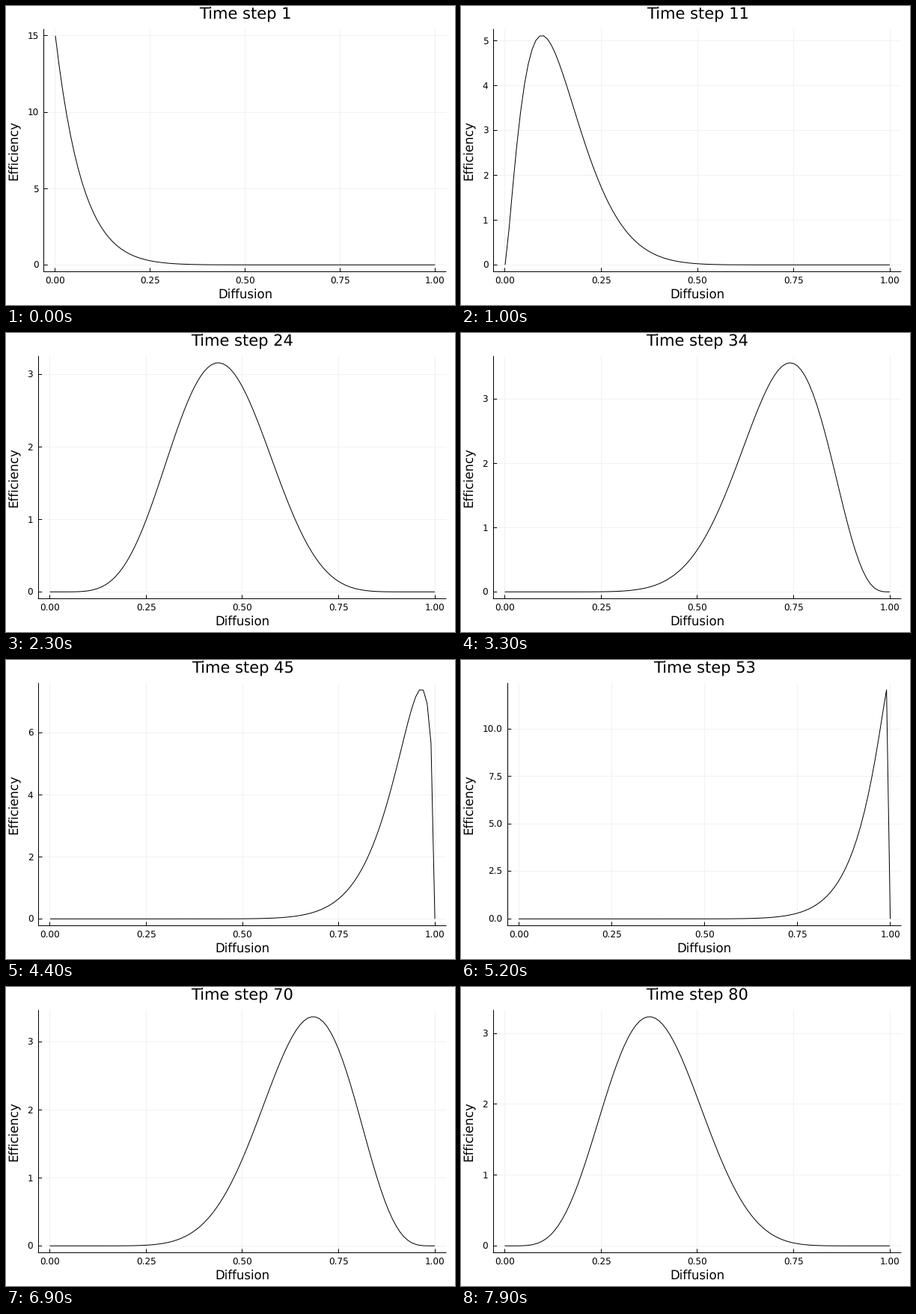
Write a matplotlib script that moves like this. It is 600 px wide and 400 px high and loops after 8000 ms.

```python
from math import cos, exp, lgamma, pi

import matplotlib.pyplot as plt
import numpy as np
from matplotlib.animation import FuncAnimation

W, H, DPI = 600, 400, 100
PX = 72 / DPI                      # points per pixel
FRAMES, PERIOD = 80, 100
RIGHT, TOP, BOTTOM = 588.5, 30.7, 355.5
PAD = 0.03
TICK_FONT, LABEL_FONT, TITLE_FONT = 12, 16.5, 21
GRID = "#f1f1f1"
# tick spacing and how pleasant it is, widest first
STEPS = [(5, 0.9), (3, 0.2), (2.5, 0.5), (2, 0.7), (1, 1.0), (0.5, 0.9)]

plt.rcParams.update({
    "font.family": "DejaVu Sans",
    "text.hinting": "none",
    "path.simplify": False,
})

fig = plt.figure(figsize=(W / DPI, H / DPI), dpi=DPI, facecolor="white")
ax = fig.add_axes([0, 0, 1, 1])
x = np.linspace(0, 1, 101)


def beta_pdf(a, b):
    scale = exp(lgamma(a + b) - lgamma(a) - lgamma(b))
    return scale * x ** (a - 1) * (1 - x) ** (b - 1)


def pick_ticks(peak):
    """Score the spacings by tick count, coverage and niceness."""
    best, ticks = -1, None
    for step, nice in STEPS:
        n = int((1 + PAD) * peak / step + 1e-9) + 1
        if not 4 <= n <= 8:
            continue
        count = 1 - abs(n - 5) / 5
        cover = (1 + 2 * PAD) * peak / ((n - 1) * step)
        score = count / 4 + cover / 2 + nice / 4
        if score > best + 1e-9:
            best, ticks = score, step * np.arange(n)
    return ticks


def tick_labels(ticks):
    digits = 0 if np.all(ticks == np.round(ticks)) else 1
    return [f"{v:.{digits}f}" for v in ticks]


def left_edge(labels):
    widest = max(labels, key=len)
    em = sum(0.318 if c == "." else 0.636 for c in widest)
    extra = 0.4 if len(widest) == 1 and "4" in labels else 0
    return 35.5 + TICK_FONT * em + extra


def line(xs, ys, color="black", z=2):
    ax.plot(xs, ys, color=color, lw=PX, zorder=z,
            solid_capstyle="butt", solid_joinstyle="round")


def rule(x0, y0, x1, y1, color="black", z=2):
    """Straight line through the centres of the pixels it falls in."""
    if x0 == x1:
        x0 = x1 = np.floor(x0) + 0.5
    else:
        y0 = y1 = np.floor(y0) + 0.5
    ax.plot([x0, x1], [y0, y1], color=color, lw=PX, zorder=z,
            solid_capstyle="butt", snap=False)


def text(px, py, s, size, ha="center", **kw):
    ax.text(px, py, s, fontsize=size * PX, ha=ha, va="baseline",
            color="black", **kw)


def draw(i):
    ax.cla()
    ax.set(xlim=(0, W), ylim=(H, 0))
    ax.axis("off")

    a = 8 - 7 * cos(2 * pi * i / PERIOD)
    y = beta_pdf(a, 16 - a)
    peak = y.max()
    ticks = pick_ticks(peak)
    labels = tick_labels(ticks)
    left = left_edge(labels)
    mid = (left + RIGHT) / 2

    def to_x(v):
        return left + (v + PAD) / (1 + 2 * PAD) * (RIGHT - left)

    def to_y(v):
        return BOTTOM - (v / peak + PAD) / (1 + 2 * PAD) * (BOTTOM - TOP)

    for v in np.linspace(0, 1, 5):
        px = to_x(v)
        rule(px, TOP, px, BOTTOM, GRID, 1)
        rule(px, BOTTOM, px, BOTTOM - 5)
        text(px, 372, f"{v:.2f}", TICK_FONT)
    for v, s in zip(ticks, labels):
        py = to_y(v)
        rule(left, py, RIGHT, py, GRID, 1)
        rule(left, py, left + 5, py)
        text(left - 7, py + 4.4, s, TICK_FONT, ha="right")

    rule(left, TOP, left, BOTTOM + 0.5)
    rule(left - 0.5, BOTTOM, RIGHT, BOTTOM)
    line(to_x(x), to_y(y), z=3)

    text(mid, 18, f"Time step {i + 1}", TITLE_FONT)
    text(mid, 392, "Diffusion", LABEL_FONT)
    text(15.7, (TOP + BOTTOM) / 2, "Efficiency", LABEL_FONT,
         rotation=90, rotation_mode="anchor")
    return []


anim = FuncAnimation(fig, draw, frames=FRAMES, interval=100,
                     init_func=lambda: draw(0), repeat=True, repeat_delay=0,
                     blit=False)
plt.show()
```
